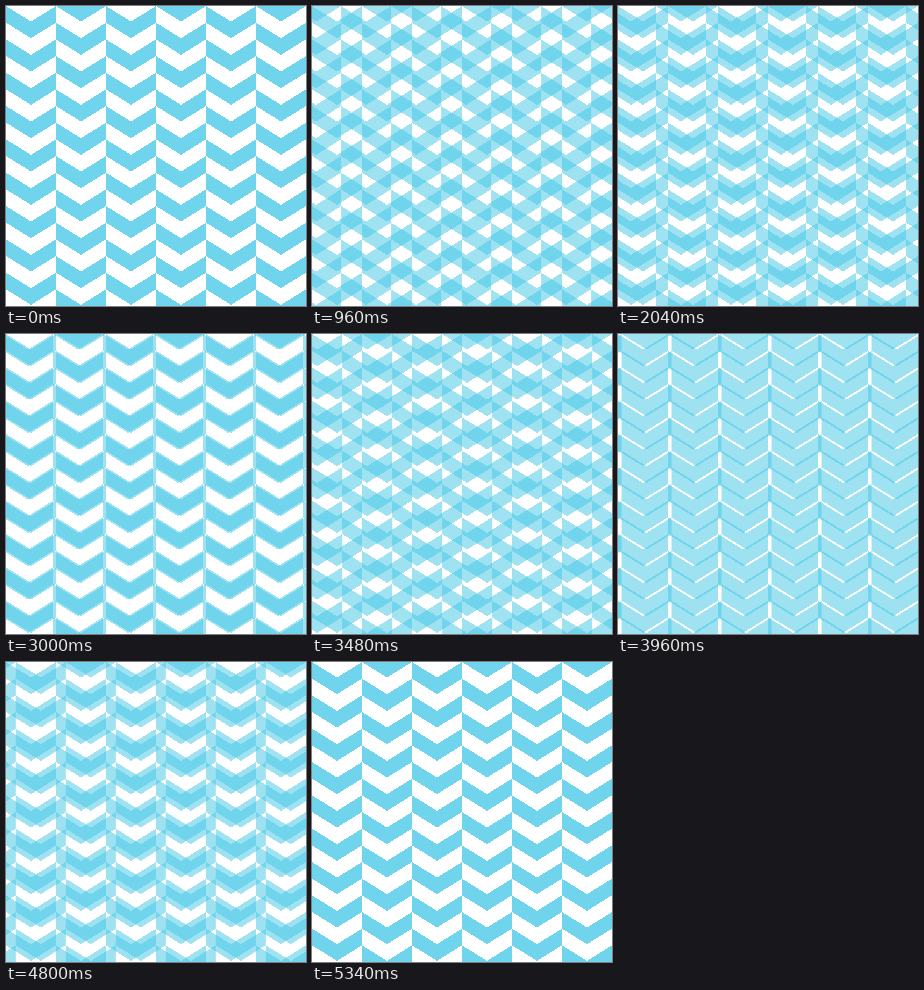
Animation of 300 by 300 pixels, one loop 5400 ms. Source, as an HTML page without scripts:

```html
<!DOCTYPE html>
<html lang="en">
<head>
<meta charset="utf-8">
<title>Sliding chevrons</title>
<style>
  html, body { margin: 0; width: 100%; height: 100%; overflow: hidden; background: #fff; }
  svg { display: block; width: 300px; height: 300px; }
  .stripe { fill: none; stroke: #40c6e6; stroke-width: 25; stroke-dasharray: 16.6667; }
  .layer { opacity: .5; }
  .slider { animation: slide 5400ms cubic-bezier(.37, 0, .63, 1) infinite; }

  /* out and back, resting one 60 ms beat at each end */
  @keyframes slide {
    0%, 98.889%, 100% { transform: translateX(0); }
    48.889%, 50% { transform: translateX(100px); }
  }
</style>
</head>
<body>
<svg viewBox="0 0 300 300" shape-rendering="crispEdges">
  <defs>
    <!-- two skewed dashed lines make one column of chevrons -->
    <g id="column">
      <path class="stripe" d="M12.5 -100V400" transform="matrix(1 .62 0 1 0 0)"/>
      <path class="stripe" d="M37.5 -100V400" transform="matrix(1 -.62 0 1 0 31)"/>
    </g>
    <g id="pair">
      <use href="#column"/>
      <use href="#column" x="50" y="16.6667"/>
    </g>
    <g id="chevrons">
      <use href="#pair" x="-100"/>
      <use href="#pair"/>
      <use href="#pair" x="100"/>
      <use href="#pair" x="200"/>
    </g>
  </defs>
  <use class="layer" href="#chevrons"/>
  <use class="layer slider" href="#chevrons"/>
</svg>
</body>
</html>
```
